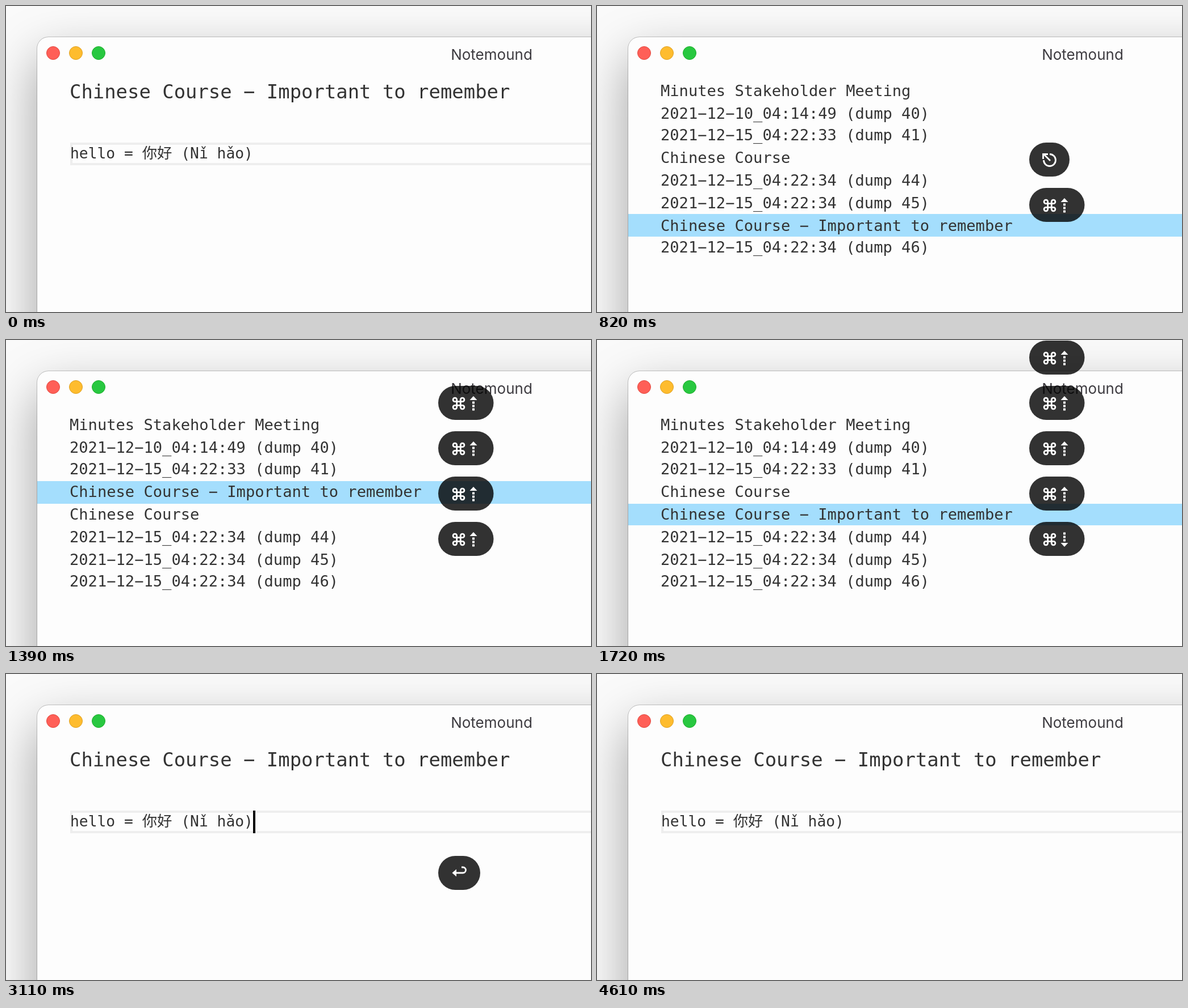
An HTML page for the animation above (5.11 s loop, 1030 by 540 pixels).

```html
<!DOCTYPE html>
<html lang="en">
<head>
<meta charset="utf-8">
<title>Note list</title>
<style>
  html, body { margin: 0; width: 1030px; height: 540px; overflow: hidden; background: #fafafa; }
  body { position: relative; }
  #window {
    position: absolute; left: 55px; top: 55px; width: 1500px; height: 900px;
    border-radius: 20px; background: #fdfdfd;
    box-shadow: 0 0 0 1px rgba(0, 0, 0, .2), 0 36px 90px rgba(0, 0, 0, .36);
  }
  svg { position: absolute; left: 0; top: 0; }
  text { fill: #333; font-family: "DejaVu Sans Mono", monospace; }
  .row { font-size: 27.1px; }
  .heading { font-size: 33.9px; }
  .body { font-size: 26.3px; }
  .han { font: 26.4px "Noto Sans CJK SC", "Noto Sans CJK", sans-serif; }
  .title { font: 26px Inter, sans-serif; fill: #3d3b40; text-anchor: middle; }
  .line { fill: none; stroke: #fff; stroke-width: 2.8; }
  .solid { fill: #fff; }
</style>
</head>
<body>
<div id="window"></div>
<svg width="1030" height="540">
  <circle cx="83" cy="83" r="11.5" fill="#ff5f57" stroke="#e2483f"/>
  <circle cx="123" cy="83" r="11.5" fill="#febc2e" stroke="#dfa023"/>
  <circle cx="163" cy="83" r="11.5" fill="#28c840" stroke="#1dad2b"/>
  <text class="title" x="855" y="95">Notemound</text>
  <g id="editor">
    <path d="M1040 243H115V279H1040" fill="none" stroke="#eee" stroke-width="4"/>
    <text class="heading" x="112" y="163">Chinese Course − Important to remember</text>
    <text class="body" x="113" y="269">hello = <tspan class="han" lang="zh-Hans">你好</tspan> (Nǐ hǎo)</text>
    <rect id="caret" x="435" y="241" width="4" height="40"/>
  </g>
  <g id="list"></g>
  <g id="pills"></g>
</svg>
<script>
const LOOP = 5110;
const LIST_START = 160, LIST_END = 3110;
const BASELINES = [159, 199, 237, 277, 317, 357, 397, 435];
const ROW_EDGES = [131, 171, 209, 249, 289, 327, 367, 407, 447];
const MOVED = 'Chinese Course − Important to remember';
const stamp = (time, n) => `2021−12−${time} (dump ${n})`;
const NOTES = [
  'Minutes Stakeholder Meeting',
  stamp('10_04:14:49', 40),
  stamp('15_04:22:33', 41),
  'Chinese Course',
  ...[44, 45, 46].map(n => stamp('15_04:22:34', n)),
];

// [start, row of the selected note]
const MOVES = [[160, 7], [820, 6], [980, 5], [1140, 4], [1390, 3], [1720, 4]];

// [key, pressed, gone]
const KEYS = [
  ['esc', 160, 1390],
  ['up', 820, 2050],
  ['up', 980, 2210],
  ['up', 1140, 2370],
  ['up', 1390, 2620],
  ['down', 1720, 3030],
  ['enter', 3110, 4360],
];

// Icons are drawn around the pill's vertical centre.
const COMMAND = `<path class="line" transform="translate(36 1)" d="M-3.3-6.6V6.6
  A3.3 3.3 0 1 1-6.6 3.3H6.6A3.3 3.3 0 1 1 3.3 6.6V-6.6
  A3.3 3.3 0 1 1 6.6-3.3H-6.6A3.3 3.3 0 1 1-3.3-6.6Z"/>`;
const arrow = flip => `${COMMAND}<path class="solid" transform="translate(62 1) scale(1 ${flip})"
  d="M0-13L6.5-6H-6.5ZM-2-3.5h4v4h-4zM-2 2.5h4v4h-4zM-2 8.5h4v4h-4z"/>`;
const PILLS = {
  esc: [71, '<path class="line" d="M36-9.5A10.5 10.5 0 1 1 25.5 1M37 2L25-10M33-9.5H24.5V-1"/>'],
  up: [97.5, arrow(1)],
  down: [97.5, arrow(-1)],
  enter: [74, `<path class="line" d="M30 0H43.5A5 5 0 0 0 43.5-10H41"/>
    <path class="solid" d="M24.5 0L32-6.5V6.5Z"/>`],
};

const byId = id => document.getElementById(id);
const editor = byId('editor'), caret = byId('caret');
const list = byId('list'), pills = byId('pills');
const show = (el, on) => { el.style.display = on ? '' : 'none'; };

function update(el, markup) {
  if (el.markup !== markup) el.innerHTML = el.markup = markup;
}

function listMarkup(t) {
  const row = MOVES.filter(([start]) => t >= start).pop()?.[1] ?? 7;
  const notes = [...NOTES];
  notes.splice(row, 0, MOVED);
  const top = ROW_EDGES[row];
  return `<rect x="55" y="${top}" width="975" height="${ROW_EDGES[row + 1] - top}" fill="#a4defd"/>` +
    notes.map((note, i) => `<text class="row" x="112" y="${BASELINES[i]}">${note}</text>`).join('');
}

function pillMarkup(t) {
  const pressed = KEYS.filter(([, start]) => t >= start);
  return pressed.map(([key, , end], i) => {
    if (t >= end) return '';
    const [width, icon] = PILLS[key];
    const y = 351 - 80 * (pressed.length - 1 - i);
    return `<g transform="translate(761 ${y})">
      <rect y="-30" width="${width}" height="60" rx="30" fill-opacity=".8"/>${icon}</g>`;
  }).join('');
}

function draw() {
  const t = performance.now() % LOOP;
  const listing = t >= LIST_START && t < LIST_END;
  show(editor, !listing);
  show(list, listing);
  show(caret, t >= LIST_END && (t - LIST_END) % 1000 < 500);
  update(list, listMarkup(t));
  update(pills, pillMarkup(t));
  requestAnimationFrame(draw);
}
draw();
</script>
</body>
</html>
```
